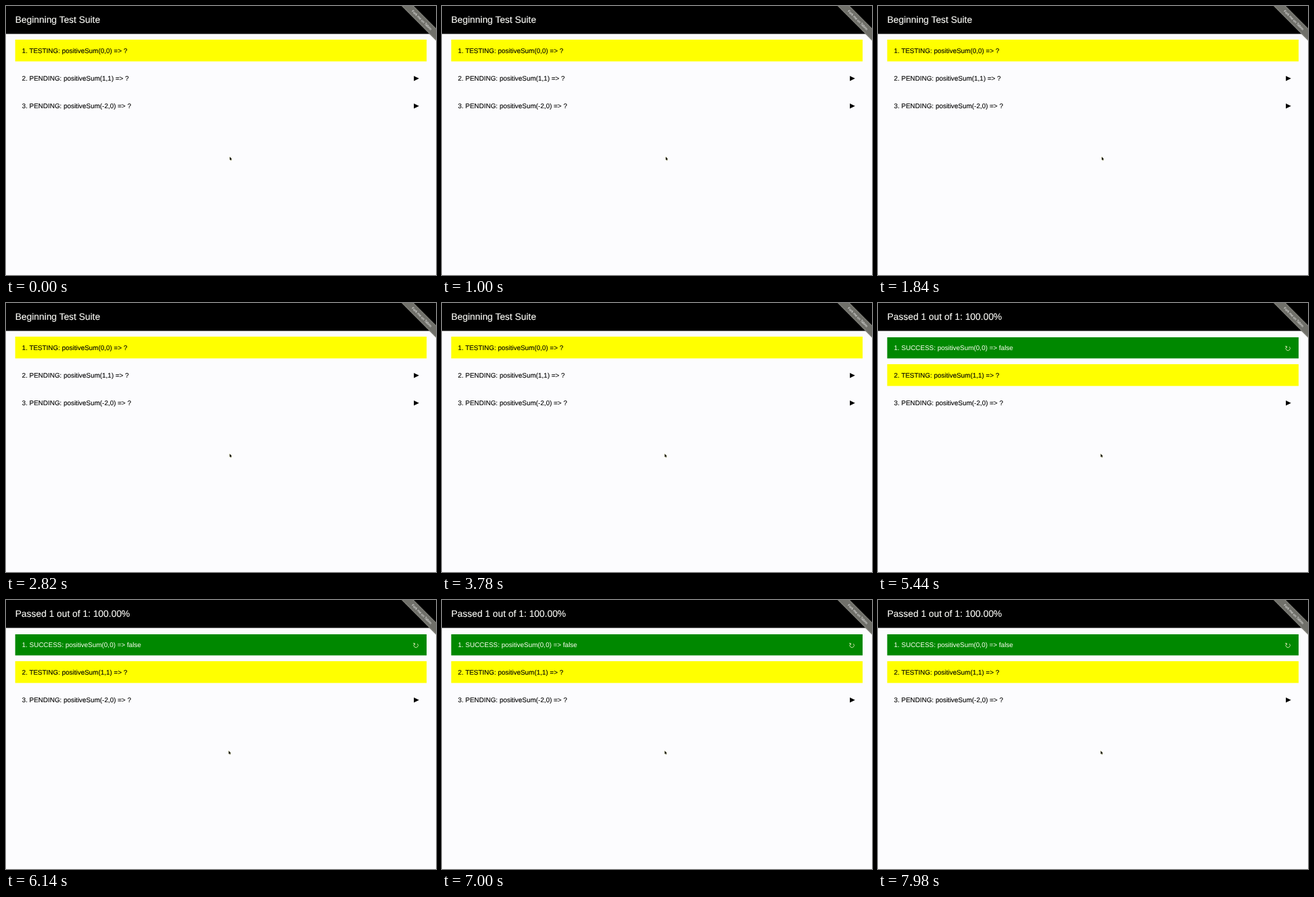
Write an HTML page that moves like this. It is 640x400 px and loops after 8000 ms.

```html
<!DOCTYPE html>
<html lang="en">
<head>
<meta charset="utf-8">
<title>Test suite</title>
<style>
  html, body { margin: 0; width: 100%; height: 100%; overflow: hidden; background: #fcfcfe; }
  svg { display: block; width: 640px; height: 400px; }
  text {
    font-family: "Liberation Sans", Arial, Helvetica, sans-serif;
    white-space: pre;
    text-rendering: geometricPrecision;
  }
  .title { font-size: 13.9px; fill: #fffffa; stroke: #fffffa; stroke-width: .12px; }
  .row text { font-size: 9.95px; fill: #000; stroke: #000; stroke-width: .12px; }
  .row .bar { fill: none; }
  .row .play, .row .redo { display: none; }
  .pending .play { display: inline; }
  .testing .bar { fill: #ff0; y: -1px; height: 32.4px; }
  .success .bar { fill: #008800; }
  .row.success text { fill: #fffff4; stroke: none; }
  .success .redo { display: inline; }
  .ribbon text { font-size: 5px; fill: #fff; text-anchor: middle; }
</style>
</head>
<body>
<svg viewBox="0 0 640 400">
  <rect width="640" height="400" fill="#fcfcfe"/>
  <rect width="640" height="41.5"/>
  <text class="title" id="title" x="13.8" y="25"></text>
  <g id="rows"></g>
  <g class="ribbon" transform="translate(618.8 21) rotate(45)">
    <rect x="-50" y="-6.5" width="100" height="13" fill="#70706a"/>
    <path d="M-50-5.6H50M-50 5.6H50" stroke="#a8a8a0" stroke-width=".6" stroke-dasharray="1.2 .8"/>
    <text y="1.7">Fork me on Tabrin</text>
  </g>
  <g id="cursor">
    <path d="M0 0V4.9L1 4L1.8 5.6L2.6 5.1L1.9 3.7H3.3Z" fill="#000" stroke="#f4f4a0" stroke-width=".5" paint-order="stroke"/>
  </g>
</svg>
<script>
const LOOP = 8000, PASS_AT = 5440;
const CURSOR = { from: 333, to: 331.5, start: 2780, end: 3360, y: 224.2 };
const calls = ["positiveSum(0,0)", "positiveSum(1,1)", "positiveSum(-2,0)"];
const scenes = [
  { title: "Beginning Test Suite", states: ["testing", "pending", "pending"] },
  { title: "Passed 1 out of 1: 100.00%", states: ["success", "testing", "pending"] }
];

const byId = id => document.getElementById(id);
const title = byId("title"), cursor = byId("cursor");

byId("rows").innerHTML = calls.map((_, i) => `
  <g transform="translate(0 ${51 + i * 41})"><g class="row">
    <rect class="bar" x="13.7" y="0" width="612.3" height="31.4"/>
    <text x="23.8" y="19.4"></text>
    <path class="play" d="M607 12.4L614.8 16.2L607 20Z" transform="translate(0 -.4)"/>
    <g class="redo" fill="none" stroke="#f4f4c8" stroke-width=".8">
      <path d="M608 14.1A3.2 3.2 0 1 0 612.3 14.1"/>
      <path d="M606 13.4H608.4V15.8"/>
    </g>
  </g></g>`).join("");
const rows = [...document.querySelectorAll(".row")];

function show(scene) {
  title.textContent = scene.title;
  rows.forEach((row, i) => {
    const state = scene.states[i];
    const result = state === "success" ? "false" : "?";
    row.setAttribute("class", "row " + state);
    row.querySelector("text").textContent =
      `${i + 1}. ${state.toUpperCase()}: ${calls[i]} => ${result}`;
  });
}

let current;
function draw(t) {
  const scene = scenes[t < PASS_AT ? 0 : 1];
  if (scene !== current) show(current = scene);
  const { from, to, start, end, y } = CURSOR;
  const k = Math.min(1, Math.max(0, (t - start) / (end - start)));
  cursor.setAttribute("transform", `translate(${from + (to - from) * k} ${y})`);
}

const began = performance.now();
function tick() {
  draw((performance.now() - began) % LOOP);
  requestAnimationFrame(tick);
}
tick();
</script>
</body>
</html>
```
